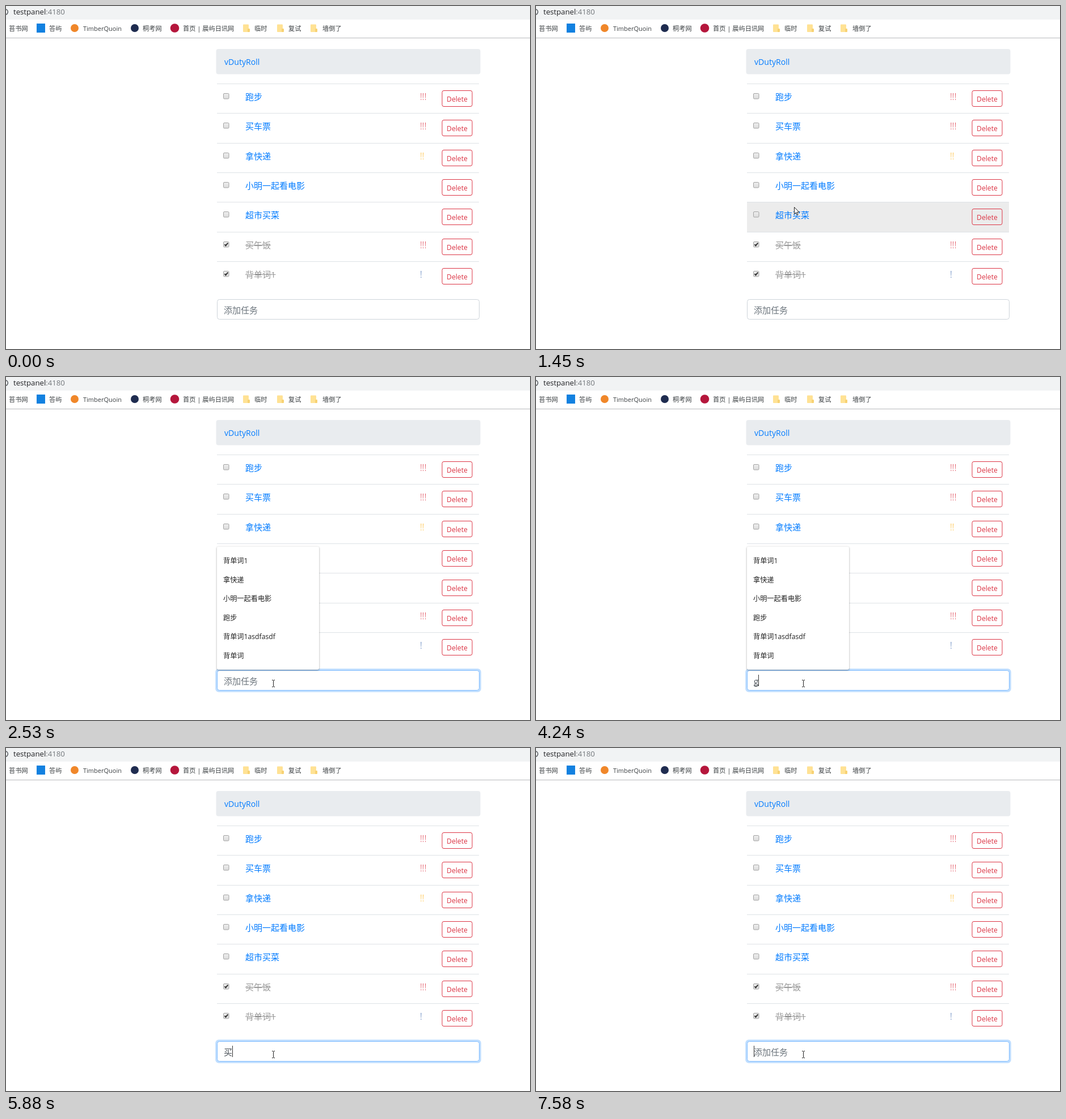
An HTML page with a canvas for the animation above (8 s loop, 924 by 606 pixels).

```html
<!DOCTYPE html>
<html lang="zh-CN">
<head>
<meta charset="utf-8">
<title>Todo</title>
<style>
html, body { margin: 0; width: 100%; height: 100%; overflow: hidden; background: #fff; }
canvas { display: block; }
</style>
</head>
<body>
<canvas id="stage" width="924" height="606"></canvas>
<script>
const ctx = document.getElementById('stage').getContext('2d');
const LOOP = 8000;
const FONT = '"Open Sans", "Noto Sans CJK SC", "Noto Sans CJK", "Noto Sans", sans-serif';
const BLUE = '#007bff', RED = '#dc3545';
const INPUT_X = 384;

const tasks = [
  { name: '跑步', marks: 3 },
  { name: '买车票', marks: 3 },
  { name: '拿快递', marks: 2 },
  { name: '小明一起看电影', marks: 0 },
  { name: '超市买菜', marks: 0 },
  { name: '买午饭', marks: 3, done: true },
  { name: '背单词1', marks: 1, done: true }
];
const markColors = ['', '#3f6ab0', '#ffb61e', RED];
const suggestions = ['背单词1', '拿快递', '小明一起看电影', '跑步', '背单词1asdfasdf', '背单词'];

// Input states: start time, committed text, composition, candidates, popup width
const typing = [
  [0, '', ''],
  [4240, '', 'g'],
  [4330, '', 'g', '个 过 给 国 跟 该 高', 452],
  [4850, '', ''],
  [5170, '', 'm', '吗 没 们 买 每 面 么', 460],
  [5250, '', 'ma', '吗 妈 马 嘛 骂 麻 码', 460],
  [5400, '', 'mai', '买 卖 麦 迈 埋 脉 霾', 460],
  [5880, '买', ''],
  [6350, '买', 'm', '吗 没 们 买 每 面 么', 530],
  [6500, '买', 'mi', '米 密 迷 秘 蜜 眯 觅', 530],
  [6660, '买', 'mia', '面 免 棉 眠 喵 秒 妙', 530],
  [6730, '买', 'mian', '面 面包 面条 免 棉 眠 绵', 530],
  [7040, '买面包', ''],
  [7580, '', '']
];

const rowTop = i => Math.round(137 + 52.3 * i);
const lerp = (a, b, k) => a + (b - a) * k;
const clamp01 = v => Math.max(0, Math.min(1, v));
const easeOut = k => 1 - (1 - k) ** 2;

function rect(x, y, w, h, color) {
  ctx.fillStyle = color;
  ctx.fillRect(x, y, w, h);
}

function box(x, y, w, h, r, fill, stroke) {
  ctx.beginPath();
  ctx.roundRect(x, y, w, h, r);
  if (fill) { ctx.fillStyle = fill; ctx.fill(); }
  if (stroke) { ctx.strokeStyle = stroke; ctx.lineWidth = 1; ctx.stroke(); }
}

function disc(x, y, r, color) {
  ctx.fillStyle = color;
  ctx.beginPath();
  ctx.arc(x, y, r, 0, 7);
  ctx.fill();
}

// Draws text and returns its width
function text(str, x, y, size, color, weight = 400) {
  ctx.font = `${weight} ${size}px ${FONT}`;
  ctx.fillStyle = color;
  ctx.fillText(str, x, y);
  return ctx.measureText(str).width;
}

function polyline(points, color, width) {
  ctx.beginPath();
  points.forEach(([x, y]) => ctx.lineTo(x, y));
  ctx.strokeStyle = color;
  ctx.lineWidth = width;
  ctx.stroke();
}

function drawFolder(x) {
  box(x, 32.5, 10, 13.5, 1, '#ffe294');
  box(x + 8, 40, 4, 6, 1, '#f7d274');
}

function drawBrowser() {
  rect(0, 0, 924, 24, '#f1f3f4');
  rect(0, 56, 924, 1, '#b8babc');
  ctx.strokeStyle = '#5f6368';
  ctx.lineWidth = 1.6;
  ctx.beginPath();
  ctx.arc(-1.5, 10.5, 4.8, -1.3, 1.3);
  ctx.stroke();
  const w = text('testpanel', 13, 15, 13.2, '#202124');
  text(':4180', 13 + w, 15, 13.2, '#74787c');

  rect(54, 31, 15, 16, '#1281e0');
  disc(121, 39, 7, '#f0872a');
  disc(227, 39, 7, '#1f2c50');
  disc(297.5, 39, 7.8, '#b5163c');
  [418, 478, 537].forEach(drawFolder);
  const labels = [['苔书网', 5], ['答屿', 76], ['桐考网', 241],
    ['首页 | 晨屿日讯网', 312], ['临时', 438], ['复试', 498], ['墙倒了', 558]];
  labels.forEach(([s, x]) => text(s, x, 44, 11.2, '#3c4043'));
  text('TimberQuoin', 136, 44, 11, '#3c4043');
}

function drawCheckbox(x, y, checked) {
  const g = ctx.createLinearGradient(0, y, 0, y + 10);
  g.addColorStop(0, '#efefef');
  g.addColorStop(1, '#dcdcdc');
  box(x + .5, y + .5, 9.5, 9.5, 1.5, g, '#a3a3a3');
  if (checked) polyline([[x + 2.5, y + 5.2], [x + 4.4, y + 7.4], [x + 8.3, y + 2.6]], '#333', 2);
}

function drawTask(task, i, hovered) {
  const y = rowTop(i);
  if (hovered) rect(372, y, 462, (i < 6 ? rowTop(i + 1) : 503) - y, '#ececec');
  rect(372, y, 462, 1, '#dee2e6');
  drawCheckbox(383, y + 17, task.done);
  const w = text(task.name, 422, y + 28.5, 15, task.done ? '#999' : BLUE);
  if (task.done) rect(422, y + 23, w, 1, '#999');
  text('!'.repeat(task.marks), 730, y + 28.5, 16, markColors[task.marks], 300);
  box(769, y + 12.5, 53, 28, 3, null, RED);
  text('Delete', 777, y + 32, 12.2, RED);
}

function drawSuggestions() {
  ctx.save();
  ctx.shadowColor = 'rgba(0,0,0,.4)';
  ctx.shadowBlur = 3;
  ctx.shadowOffsetY = 1;
  box(372, 299.5, 180, 217.5, 3, '#fff');
  ctx.restore();
  suggestions.forEach((s, i) => text(s, 383, 329 + 33.6 * i, 12.2, '#222'));
}

function drawCandidates(x, width, list) {
  box(x + .5, 557.5, width - 1, 32, 0, '#fff', '#c8c8c8');
  const words = list.split(' ');
  const step = (width - 56) / words.length;
  words.forEach((word, i) => {
    const left = x + 8 + i * step;
    if (i === 0) rect(x + 1, 558, step, 31, '#0078d7');
    text(i + 1, left, 578, 12, i ? '#777' : '#fff');
    text(word, left + 14, 579, 15, i ? '#111' : '#fff');
  });
  const end = x + width;
  polyline([[end - 36, 569], [end - 40, 573.5], [end - 36, 578]], '#888', 1);
  polyline([[end - 22, 569], [end - 18, 573.5], [end - 22, 578]], '#888', 1);
}

function caretOn(t) {
  if (t < 1980) return false;
  return !(t >= 2530 && t < 3080) && !(t >= 3620 && t < 4080);
}

function drawInput(t) {
  const focus = clamp01((t - 1940) / 190);
  if (focus) box(369.2, 515.2, 468.6, 41.6, 6, `rgba(0,123,255,${.25 * focus})`);
  const border = [[206, 128], [212, 189], [218, 255]].map(([a, b]) => Math.round(lerp(a, b, focus)));
  box(372.5, 518.5, 462, 35, 4, '#fff', `rgb(${border})`);

  const [, done, comp, list, width] = typing.findLast(s => t >= s[0]);
  let x = INPUT_X;
  if (done || comp) {
    x += text(done, x, 542.5, 15, '#495057');
    const start = x;
    x += text(comp, x, 542.5, 15, '#495057');
    if (comp) rect(start, 545, x - start, 1, '#495057');
    if (list) drawCandidates(Math.round(start), width, list);
  } else {
    text('添加任务', x, 542.5, 15, '#6c757d');
  }
  if (caretOn(t)) rect(Math.round(x), 526, 1, 20, '#333');
}

// Index of the pointer sample; samples come about every 75 ms
const sample = (t, start, last) => Math.min(last, Math.floor((t - start) / 75.5 + .15));

// Pointer moves in discrete samples: up the list, then down into the input
function pointer(t) {
  if (t < 520) return null;
  if (t < 1380) {
    const i = sample(t, 520, 9);
    if (i <= 4) return [lerp(640, 560, i / 4), lerp(516, 243, i / 4)];
    const k = easeOut((i - 4) / 5);
    return [lerp(560, 525, k), lerp(243, 165, k)];
  }
  const i = sample(t, 1380, 6);
  if (i === 0) return [490, 250];
  const k = easeOut((i - 1) / 5);
  return [lerp(455, 471, k), lerp(355, 541, k)];
}

function drawPointer([x, y]) {
  ctx.save();
  ctx.translate(Math.round(x), Math.round(y));
  if (y > 518) {
    rect(0, -5, 1, 11, '#222');
    [-6, 6].forEach(v => {
      rect(-2, v, 2, 1, '#222');
      rect(1, v, 2, 1, '#222');
    });
  } else {
    const shape = new Path2D('M.5 .5V12.5L3.3 9.9L5.2 14.3L7 13.5L5.1 9.2H9Z');
    ctx.fillStyle = '#fff';
    ctx.fill(shape);
    ctx.strokeStyle = '#222';
    ctx.lineWidth = 1;
    ctx.stroke(shape);
  }
  ctx.restore();
}

function draw(t) {
  rect(0, 0, 924, 606, '#fff');
  drawBrowser();
  box(370.5, 76, 466, 44.5, 4, '#e9ecef');
  text('vDutyRoll', 385, 104, 14.1, BLUE);

  const pos = pointer(t);
  tasks.forEach((task, i) => {
    const bottom = i < 6 ? rowTop(i + 1) : 503;
    drawTask(task, i, pos && pos[1] >= rowTop(i) && pos[1] < bottom);
  });
  drawInput(t);
  if (t >= 2060 && t < 4330) drawSuggestions();
  if (pos) drawPointer(pos);
}

const begin = performance.now();
function tick() {
  draw((performance.now() - begin) % LOOP);
  requestAnimationFrame(tick);
}
tick();
</script>
</body>
</html>
```
